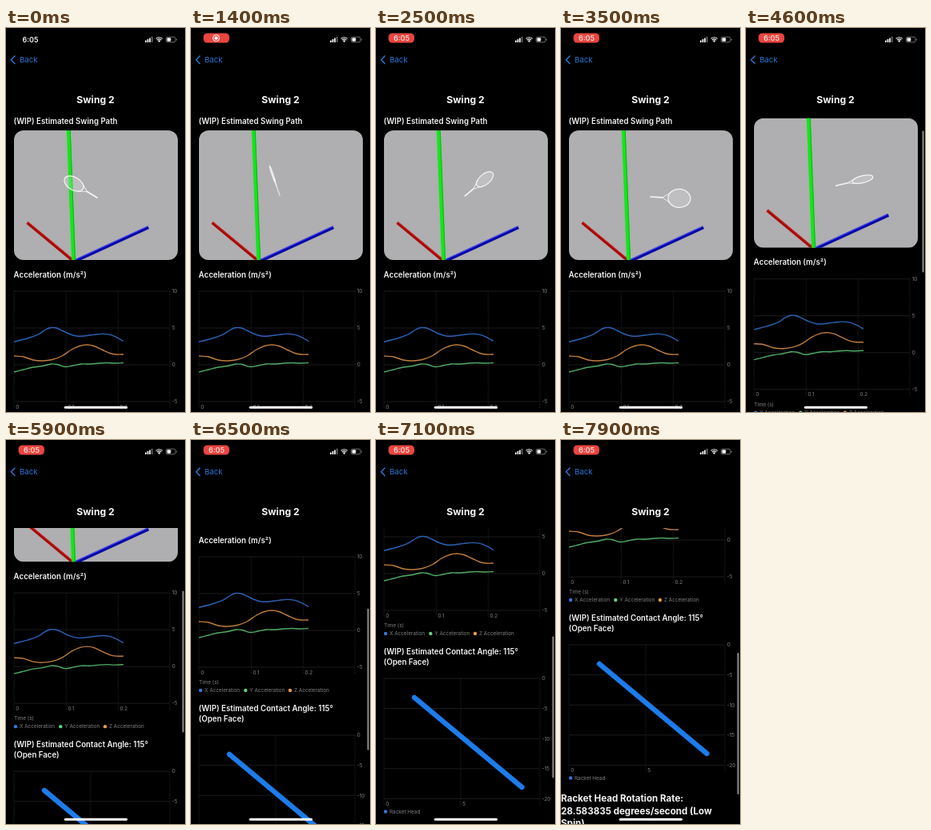
These frames come from a looping animation (224 by 480 pixels, 8 s). An HTML page:

```html
<!DOCTYPE html>
<html lang="en">
<head>
<meta charset="utf-8">
<title>Swing 2</title>
<style>
  html, body { margin: 0; width: 224px; height: 480px; overflow: hidden; background: #000; }
  svg { display: block; }
  text { font-family: Inter, Roboto, "Liberation Sans", sans-serif; fill: #f4f4f4; }
  .head { font-size: 9.7px; font-weight: 600; }
  .rate { font-size: 11.6px; font-weight: 700; }
  .small { font-size: 6.4px; fill: #808084; }
  .grid { stroke: #222224; stroke-width: .8; fill: none; }
  .column { stroke-dasharray: 2 1; }
  .series { fill: none; stroke-width: 1.4; stroke-linejoin: round; stroke-opacity: .82; }
  .racket { fill: none; stroke: #f6f6f6; stroke-linecap: round; }
</style>
</head>
<body>
<svg width="224" height="480" viewBox="0 0 224 480">
  <defs>
    <clipPath id="view"><rect y="110" width="224" height="370"/></clipPath>
    <clipPath id="panel"><rect x="10" y="128" width="205" height="162" rx="12"/></clipPath>
  </defs>

  <g clip-path="url(#view)">
    <g id="content">
      <text class="head" x="9.6" y="119.6">(WIP) Estimated Swing Path</text>
      <g clip-path="url(#panel)">
        <rect x="10" y="128" width="205" height="162" fill="#afaeb0"/>
        <g stroke-linecap="butt">
          <path d="M26.5 243.3L84 291" stroke="#a80808" stroke-width="3.6"/>
          <path d="M27.4 242.3L85 290" stroke="#d03030" stroke-width="1"/>
          <path d="M178.3 249.2L86 291.5" stroke="#0606a8" stroke-width="4"/>
          <path d="M177.6 247.8L86 289.8" stroke="#4a4af2" stroke-width="1.2"/>
          <path d="M78.2 126L84.6 291" stroke="#10e818" stroke-width="4.8"/>
          <path d="M80.2 126L86.6 291" stroke="#0bb512" stroke-width="1"/>
        </g>
        <g id="racket" class="racket">
          <ellipse id="hoop" fill="#fff" fill-opacity=".2" stroke-width="1.2"/>
          <path id="throat" stroke-width=".9"/>
          <path id="handle" stroke-width="1.7"/>
        </g>
      </g>
      <text class="head" x="9.6" y="311.6">Acceleration (m/s²)</text>
      <g id="accel"></g>
      <text class="small" x="10" y="488.3">Time (s)</text>
      <text class="head" x="9.6" y="521.5">(WIP) Estimated Contact Angle: 115°</text>
      <text class="head" x="9.6" y="534.5">(Open Face)</text>
      <g id="angle"></g>
      <path d="M48 575.8L182.6 688" stroke="#1c7cea" stroke-width="6.3" stroke-linecap="round"/>
      <text class="rate" x="0" y="748.2">Racket Head Rotation Rate:</text>
      <text class="rate" x="0" y="763.8">28.583835 degrees/second (Low</text>
      <text class="rate" x="0" y="779">Spin)</text>
    </g>
  </g>

  <rect id="bar" x="220.5" width="2.2" height="177" rx="1.1" fill="#858589"/>

  <rect id="pill" x="15.6" y="6.4" width="32.4" height="12.2" rx="5" fill="#ea453f"/>
  <text id="clock" text-anchor="middle" font-size="9" font-weight="600">6:05</text>
  <g id="rec">
    <circle cx="31.5" cy="12.6" r="4" fill="none" stroke="#fff" stroke-width="1"/>
    <circle cx="31.5" cy="12.6" r="2.2" fill="#fff"/>
  </g>

  <g fill="#f2f2f2">
    <rect x="174" y="15.4" width="1.8" height="2.6" rx=".4"/>
    <rect x="176.6" y="14" width="1.8" height="4" rx=".4"/>
    <rect x="179.2" y="12.4" width="1.8" height="5.6" rx=".4"/>
    <rect x="181.8" y="10.8" width="1.8" height="7.2" rx=".4" fill="#666"/>
    <path d="M191.7 18l-1.7-1.9a2.4 2.4 0 0 1 3.4 0z"/>
    <path d="M187.6 13.4a5.9 5.9 0 0 1 8.2 0M189 15.1a3.9 3.9 0 0 1 5.4 0" fill="none" stroke="#f2f2f2" stroke-width="1.2"/>
    <rect x="200.4" y="11.2" width="11.6" height="6.6" rx="2" fill="none" stroke="#888" stroke-width=".8"/>
    <rect x="201.5" y="12.3" width="4.8" height="4.4" rx="1"/>
    <rect x="212.8" y="13.4" width="1" height="2.2" rx=".5" fill="#888"/>
  </g>

  <path d="M11 35L6.4 39.8L11 44.6" fill="none" stroke="#2a78da" stroke-width="1.4" stroke-linecap="round" stroke-linejoin="round"/>
  <text x="17" y="43.3" font-size="9.6" style="fill:#2a78da">Back</text>
  <text x="112" y="94.3" text-anchor="middle" font-size="12.2" font-weight="700">Swing 2</text>
  <rect x="72.8" y="472.8" width="79.2" height="3" rx="1.5" fill="#fff"/>
</svg>

<script>
const LOOP = 8000, STEP = 100;
const $ = id => document.getElementById(id);

function add(parent, tag, attrs, text) {
  const el = document.createElementNS("http://www.w3.org/2000/svg", tag);
  for (const k in attrs) el.setAttribute(k, attrs[k]);
  if (text !== undefined) el.textContent = text;
  parent.append(el);
}

function set(id, attrs) {
  for (const k in attrs) $(id).setAttribute(k, attrs[k]);
}

function label(parent, x, y, text) {
  add(parent, "text", { class: "small", x, y: y + 2.3 }, text);
}

// Grid with value labels on the right and axis labels below.
function grid(parent, top, gap, values, columns, labelY) {
  const bottom = top + gap * (values.length - 1);
  values.forEach((v, i) => {
    const y = top + gap * i;
    add(parent, "path", { class: "grid", d: `M10 ${y}H205` });
    label(parent, 207.7, y, v);
  });
  for (const [x, name] of [...columns, [205, ""]]) {
    add(parent, "path", { class: "grid column", d: `M${x} ${top}V${bottom + 9}` });
    label(parent, x + 2.2, labelY, name);
  }
}

function legend(parent, x, y, color, name) {
  add(parent, "circle", { cx: x, cy: y, r: 2.2, fill: color });
  label(parent, x + 5, y, name);
}

// Catmull-Rom curve through a flat list of x, y.
function curve(parent, color, list) {
  const pts = [];
  for (let i = 0; i < list.length; i += 2) pts.push([list[i], list[i + 1]]);
  const at = i => pts[Math.max(0, Math.min(pts.length - 1, i))];
  let d = "M" + pts[0];
  for (let i = 0; i < pts.length - 1; i++) {
    const [a, b, c, e] = [at(i - 1), at(i), at(i + 1), at(i + 2)];
    const c1 = b.map((v, k) => v + (c[k] - a[k]) / 6);
    const c2 = c.map((v, k) => v - (e[k] - b[k]) / 6);
    d += `C${c1} ${c2} ${c}`;
  }
  add(parent, "path", { class: "series", stroke: color, d });
}

const BLUE = "#3478dc", GREEN = "#62d07c", ORANGE = "#e89a4c";
const accel = $("accel"), angle = $("angle");

grid(accel, 329, 46, ["10", "5", "0", "-5"], [[10, "0"], [75.3, "0.1"], [140.3, "0.2"]], 473.5);
curve(accel, BLUE, [10, 392.2, 25, 388.5, 40, 383.2, 48, 378, 55, 374.8, 62, 374.8, 70, 378,
  78, 382, 88, 385, 98, 385, 110, 383.4, 120, 382.4, 130, 383.4, 138, 386.4, 147, 391.4]);
curve(accel, ORANGE, [10, 410, 22, 411, 34, 415, 46, 416, 58, 414.5, 70, 410, 82, 402,
  92, 397.5, 101, 396, 110, 397.5, 120, 402, 130, 406.5, 138, 408, 147, 408]);
curve(accel, GREEN, [10, 430, 22, 427, 34, 424, 46, 422.5, 56, 420, 64, 420.5, 74, 423.5,
  84, 422, 94, 420, 106, 420, 116, 419, 126, 418.5, 136, 419, 147, 418.5]);
legend(accel, 12, 496, BLUE, "X Acceleration");
legend(accel, 68.3, 496, GREEN, "Y Acceleration");
legend(accel, 124, 496, ORANGE, "Z Acceleration");

grid(angle, 552, 37.6, ["0", "-5", "-10", "-15", "-20"], [[10, "0"], [106, "5"]], 709);
legend(angle, 12, 718.5, BLUE, "Racket Head");

// Monotone cubic interpolation through [time, value] keys.
function track(keys, t) {
  const last = keys.length - 1;
  if (t <= keys[0][0]) return keys[0][1];
  if (t >= keys[last][0]) return keys[last][1];
  const slope = i => (keys[i + 1][1] - keys[i][1]) / (keys[i + 1][0] - keys[i][0]);
  const tangent = i => {
    if (i === 0 || i === last) return 0;
    const a = slope(i - 1), b = slope(i);
    return a * b > 0 ? 2 * a * b / (a + b) : 0;
  };
  const i = keys.findIndex(k => k[0] > t) - 1;
  const h = keys[i + 1][0] - keys[i][0], u = (t - keys[i][0]) / h, w = 1 - u;
  return keys[i][1] * w * w * (1 + 2 * u) + keys[i + 1][1] * u * u * (3 - 2 * u)
    + h * u * w * (w * tangent(i) - u * tangent(i + 1));
}

const SCROLL = [[4300, 0], [5300, 95], [6500, 183], [7100, 254], [7200, 265], [7900, 296]];
const poses = (...v) => [0, 1400, 3500, 5300].map((t, i) => [t, v[i]]);
const POSE = {
  x: poses(114, 111, 112, 113),
  y: poses(212, 209, 211, 213),
  turn: poses(-149, -109, 3, -22),
  length: poses(47, 39, 50, 46),
  width: poses(8, 0.8, 11.5, 0.8)
};

function drawRacket(t) {
  const { x, y, turn, length: n, width: w } =
    Object.fromEntries(Object.entries(POSE).map(([k, keys]) => [k, track(keys, t)]));
  set("racket", { transform: `translate(${x} ${y}) rotate(${turn})` });
  set("hoop", { cx: n * .72, rx: n * .28, ry: w });
  set("throat", { d: `M${n * .54} ${-w * .76}Q${n * .42} ${-w * .3} ${n * .3} 0Q${n * .42} ${w * .3} ${n * .54} ${w * .76}` });
  set("handle", { d: `M0 0H${n * .3}`, "stroke-opacity": .55 + .45 * Math.min(1, w / 6) });
}

function draw(t) {
  const scroll = track(SCROLL, t);
  set("content", { transform: `translate(0 ${-scroll})` });
  set("bar", { y: 121 + scroll * .49, opacity: track([[4200, 0], [4500, 1]], t) });

  const recording = t >= 800, icon = recording && t < 2400;
  set("pill", { opacity: +recording });
  set("rec", { opacity: +icon });
  set("clock", { opacity: icon ? 0 : recording ? .85 : 1, x: recording ? 32 : 30.5, y: recording ? 15.9 : 18 });

  drawRacket(t);
}

const start = performance.now();
function tick() {
  const t = (performance.now() - start) % LOOP;
  draw(Math.floor(t / STEP) * STEP);
  requestAnimationFrame(tick);
}
tick();
</script>
</body>
</html>
```
